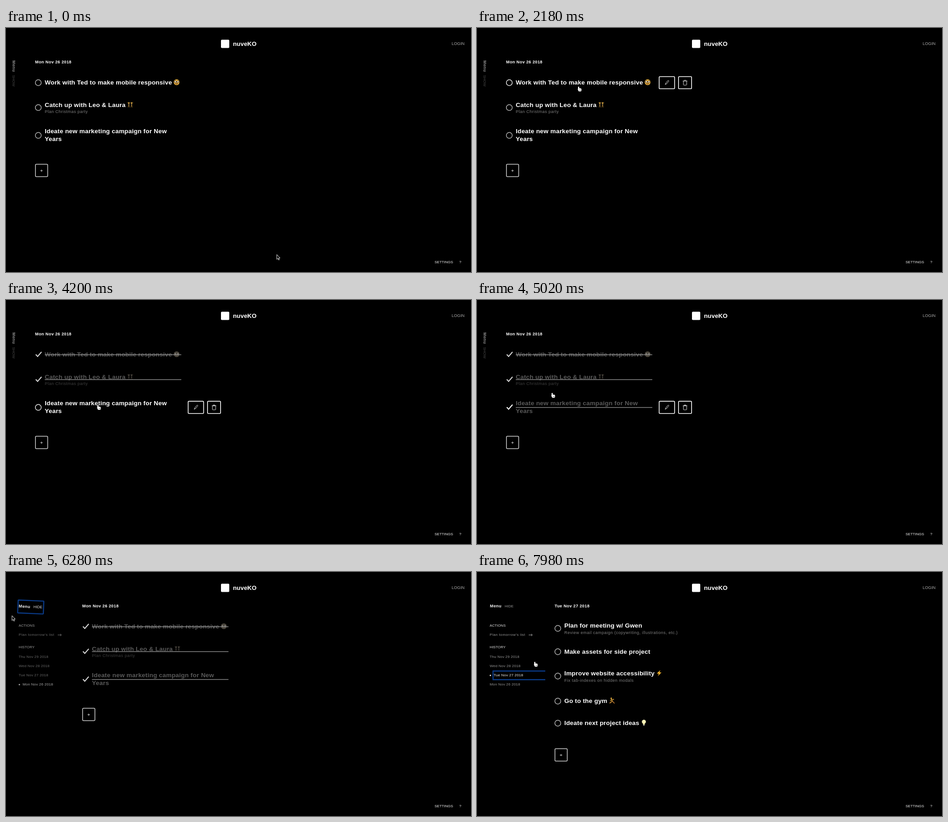
An HTML page with a canvas that plays this animation: 1008x531 px, repeating every 8000 ms.

```html
<!DOCTYPE html>
<html lang="en">
<head>
<meta charset="utf-8">
<title>Todo list</title>
<style>
  html, body { margin: 0; width: 100%; height: 100%; overflow: hidden; background: #000; }
  canvas { display: block; }
</style>
</head>
<body>
<canvas id="stage" width="1008" height="531"></canvas>
<script>
const ctx = document.getElementById('stage').getContext('2d');
const LOOP = 8000, MENU_CLICK = 5808, DAY_CLICK = 7560;
const BLUE = '#0a3a86';

// Pointer moves: the pointer rests between them
const MOVES = [
  { start: 250, end: 1350, x: 218, y: 127 },
  { start: 2650, end: 3100, x: 216, y: 168 },
  { start: 3550, end: 4100, x: 197, y: 228 },
  { start: 4850, end: 5450, x: 13, y: 95 },
  { start: 6350, end: 7000, x: 50, y: 227 },
  { start: 7600, end: 7980, x: 123, y: 195 }
];

const MONDAY = {
  date: 'Mon Nov 26 2018', plus: 310,
  tasks: [
    { y: 119, click: 2420, lines: ['Work with Ted to make mobile responsive'], icon: nerd },
    { y: 173.2, click: 3280, lines: ['Catch up with Leo & Laura'], sub: 'Plan Christmas party', icon: dancers },
    { y: 233.7, click: 4350, lines: ['Ideate new marketing campaign for New', 'Years'] }
  ]
};
const TUESDAY = {
  date: 'Tue Nov 27 2018', plus: 398,
  tasks: [
    { y: 122.7, lines: ['Plan for meeting w/ Gwen'], sub: 'Review email campaign (copywriting, illustrations, etc.)' },
    { y: 173.5, lines: ['Make assets for side project'] },
    { y: 226.5, lines: ['Improve website accessibility'], sub: 'Fix tab-indexes on hidden modals', icon: bolt },
    { y: 281, lines: ['Go to the gym'], icon: runner },
    { y: 329, lines: ['Ideate next project ideas'], icon: bulb }
  ]
};
const DAYS = ['Thu Nov 29 2018', 'Wed Nov 28 2018', TUESDAY.date, MONDAY.date];

const clamp = v => Math.max(0, Math.min(1, v));
const mix = (a, b, p) => a + (b - a) * p;
const smooth = p => p * p * (3 - 2 * p);
const gray = v => `rgb(${v},${v},${v})`;

// CSS "ease": cubic-bezier(.25, .1, .25, 1)
function ease(x) {
  x = clamp(x);
  let s = x;
  for (let lo = 0, hi = 1, i = 0; i < 20; i++) {
    s = (lo + hi) / 2;
    if (.75 * s * (1 - s) + s ** 3 < x) lo = s; else hi = s;
  }
  return .3 * s * (1 - s) ** 2 + 3 * s * s * (1 - s) + s ** 3;
}

// Draws text centred on y and returns its width
function text(str, x, y, size, color, spacing = 0, weight = 400) {
  ctx.font = `${weight} ${size}px "Liberation Sans", Arial, sans-serif`;
  ctx.letterSpacing = spacing + 'px';
  ctx.textBaseline = 'middle';
  ctx.fillStyle = color;
  ctx.fillText(str, x, y);
  return ctx.measureText(str).width;
}
function trace(points) {
  ctx.beginPath();
  for (let i = 0; i < points.length; i += 2) ctx.lineTo(points[i], points[i + 1]);
}
function stroke(points, color, width = 1) {
  trace(points);
  ctx.strokeStyle = color;
  ctx.lineWidth = width;
  ctx.stroke();
}
function fill(points, color) {
  trace(points);
  ctx.fillStyle = color;
  ctx.fill();
}
function disc(x, y, r, color) {
  ctx.beginPath();
  ctx.arc(x, y, r, 0, 7);
  ctx.fillStyle = color;
  ctx.fill();
}
function box(x, y, w, h, color, width = 1.6, radius = 2) {
  ctx.beginPath();
  ctx.roundRect(x, y, w, h, radius);
  ctx.strokeStyle = color;
  ctx.lineWidth = width;
  ctx.stroke();
}
function pill(x, y, w, h, color, radius = 2) {
  ctx.beginPath();
  ctx.roundRect(x, y, w, h, radius);
  ctx.fillStyle = color;
  ctx.fill();
}
function at(x, y, draw, angle = 0) {
  ctx.save();
  ctx.translate(x, y);
  ctx.rotate(angle);
  draw();
  ctx.restore();
}

// Emoji, each about 13 px wide and centred on 0,0
function nerd() {
  disc(0, 0, 6.3, '#f0b83d');
  for (const x of [-2.8, 2.8]) {
    disc(x, -1, 2.7, '#4a3520');
    disc(x, -1, 1.7, '#f4ead0');
  }
  pill(-3, 2.4, 6, 2, '#7a4a20');
}
function dancers() {
  for (const side of [-1, 1]) {
    disc(side * 3, -3.6, 1.7, '#dba942');
    pill(side * 3 - 1.3, -2, 2.6, 4.5, '#6f5c38', 1);
    stroke([side * 6, -5, side * 3, -1, side * .8, -4.5], '#a67c32');
    stroke([side * 4.5, 6, side * 3, 1, side * 1.5, 6], '#a67c32');
  }
}
function bolt() {
  fill([2.5, -6.5, -5, 1, 0, 1], '#f8b52c');
  fill([-2.5, 6.5, 5, -1.5, 0, -1.5], '#f8b52c');
}
function runner() {
  disc(-1.5, -5, 1.7, '#e8b040');
  stroke([-1.5, -3, .8, 1, -5, 5.5], '#c98d35', 1.8);
  stroke([.8, 1, 5.5, 6], '#b5752e', 1.8);
  stroke([-4, .5, -1, -2, 4.5, -3], '#e8b040', 1.3);
}
function bulb() {
  disc(0, -2.2, 4.4, '#f7f2b8');
  pill(-2, 1, 4, 3, '#f3eba0', 0);
  pill(-1.6, 3.5, 3.2, 3, '#a9a9a0', 1);
}

function pointerAt(t) {
  return MOVES.reduce((from, m) => {
    const p = smooth(clamp((t - m.start) / (m.end - m.start)));
    return { x: mix(from.x, m.x, p), y: mix(from.y, m.y, p) };
  }, { x: 587, y: 493 });
}

function drawButtons(y) {
  box(394.8, y - 13.3, 33.6, 26.6, '#fff');
  box(436.8, y - 13.3, 28.4, 26.6, '#fff');
  at(411.5, y, () => {
    box(-1.2, -6, 2.4, 9, '#ddd', .9, 1);
    fill([-1.2, 3, 1.2, 3, 0, 6.5], '#ddd');
  }, Math.PI / 4.5);
  at(451, y, () => {
    stroke([-5, -3.5, 5, -3.5], '#ddd');
    box(-2, -5.3, 4, 1.8, '#ddd', .9, 0);
    box(-3.6, -3.5, 7.2, 8.8, '#ddd', 1, 1);
  });
}

function drawTask(task, x, t, hovered) {
  const { y, lines, sub, icon, click = Infinity } = task;
  const done = ease((t - click) / 300);
  const check = ease((t - click - 250) / 200);
  const line = ease((t - click - 300) / 350);
  const left = x + 21;
  const titleY = y - (sub ? 5.5 : lines.length > 1 ? 8.5 : 0);

  ctx.globalAlpha = 1 - done;
  ctx.beginPath();
  ctx.arc(x + 7, y, 6.4, 0, 7);
  ctx.strokeStyle = gray(hovered ? 235 : 180);
  ctx.lineWidth = 1.5;
  ctx.stroke();
  ctx.globalAlpha = check;
  stroke([x + 1.5, y - .5, x + 5.5, y + 4, x + 14, y - 6], gray(hovered ? 255 : 215), 2.1);
  ctx.globalAlpha = 1;

  const [width] = lines.map((str, i) =>
    text(str, left, titleY + .5 + i * 17, 13.5, gray(mix(255, 88, done)), .2, 700));
  if (sub) text(sub, left, y + 9.7, 9, gray(mix(125, 62, done)), .5);
  if (icon) at(left + width + 10, titleY - 1, () => {
    ctx.globalAlpha = mix(1, .36, done);
    if (done) ctx.filter = `grayscale(${done * .8})`;
    icon();
  });
  if (line) stroke([left, y + .2, left + 296 * line, y + .2], '#a0a0a0', 1.2);
  if (hovered) drawButtons(y);
}

function drawList({ date, tasks, plus }, x, t, hovered) {
  text(date, x, 75, 9, '#fff', .4, 700);
  tasks.forEach(task => drawTask(task, x, t, task === hovered));
  box(x + .8, plus - 13.4, 26.6, 26.8, '#d0d0d0', 1.5);
  stroke([x + 11.5, plus + .5, x + 16.5, plus + .5], '#ccc');
  stroke([x + 14, plus - 2, x + 14, plus + 3], '#ccc');
}

function drawMenu(open, t) {
  const clicked = t >= MENU_CLICK, focused = clicked && t < DAY_CLICK;
  const hovered = t > 5420 && t < 6400;
  at(mix(16, 28, open), mix(70.5, 75, open), () => {
    text('Menu', 0, 0, 9, gray(clicked || hovered ? 245 : 140), .4, 700);
    text(clicked ? 'HIDE' : 'SHOW', 32, 0, 8, gray(focused || hovered ? 225 : clicked ? 150 : 70));
    if (focused) box(-1.8, -13.8, 55.6, 28, BLUE, 2.4, 1);
  }, (1 - open) * Math.PI / 2);
}

function drawSidebar(t, pointer) {
  ctx.globalAlpha = ease((t - MENU_CLICK - 350) / 300);
  text('ACTIONS', 27.5, 116.5, 7.8, '#ddd');
  text("Plan tomorrow's list", 27.5, 137, 8, '#929292', .4);
  stroke([112, 137, 120, 137], '#aaa');
  stroke([117.5, 134.5, 120, 137, 117.5, 139.5], '#aaa');
  text('HISTORY', 27.5, 164, 7.8, '#ddd');
  const selected = t < DAY_CLICK ? MONDAY.date : TUESDAY.date;
  DAYS.forEach((day, i) => {
    const y = 184.5 + i * 20.2;
    const active = day === selected;
    const hovered = pointer.x > 27 && pointer.x < 110 && Math.abs(pointer.y - y) < 10;
    text(day, active ? 36 : 27.5, y, 8, gray(active || hovered ? 238 : 146), .2);
    if (!active) return;
    disc(29, y, 1.5, '#fff');
    if (t >= DAY_CLICK) stroke([148, y - 9.4, 34.8, y - 9.4, 34.8, y + 9.4, 148, y + 9.4], BLUE, 2.4);
  });
  ctx.globalAlpha = 1;
}

function drawArrow() {
  const shape = [0, 0, 0, 10.5, 2.5, 8.3, 4.2, 12, 5.5, 11.3, 4, 7.8, 7, 7.5, 0, 0];
  fill(shape, '#000');
  stroke(shape, '#eee');
}
function drawHand() {
  pill(1, .5, 2.6, 8, '#fff', 1.3);
  pill(1.5, 4.2, 7, 6.8, '#fff', 2.2);
  fill([0, 5.8, 2, 5.8, 4, 10.5, 2.8, 10.5], '#fff');
  for (const x of [4, 5.6, 7.1]) stroke([x, 7, x, 9.3], '#333', .6);
}

function render(t) {
  ctx.fillStyle = '#000';
  ctx.fillRect(0, 0, 1008, 531);

  pill(466, 25.5, 18, 18, '#fff');
  text('nuveKO', 492, 35, 13.3, '#fff', 0, 700);
  text('LOGIN', 966, 35, 9, '#a5a5a5');
  text('SETTINGS', 929, 510, 8, '#eee');
  text('?', 982.5, 510, 8, '#eee');

  const pointer = pointerAt(t);
  const open = ease((t - MENU_CLICK) / 600);
  const list = t < DAY_CLICK ? MONDAY : TUESDAY;
  const overList = t < MENU_CLICK && pointer.x > 63 && pointer.x < 466;
  const hovered = overList && list.tasks.find(({ y, lines }) =>
    Math.abs(pointer.y - y) < 16 + 8.5 * lines.length);

  drawList(list, mix(63, 168.2, open), t, hovered);
  drawMenu(open, t);
  drawSidebar(t, pointer);

  const overMenu = t > 5400 && t < MENU_CLICK;
  at(pointer.x, pointer.y, hovered || overMenu || t > 6650 ? drawHand : drawArrow);
}

function tick() {
  render(performance.now() % LOOP);
  requestAnimationFrame(tick);
}
tick();
</script>
</body>
</html>
```
